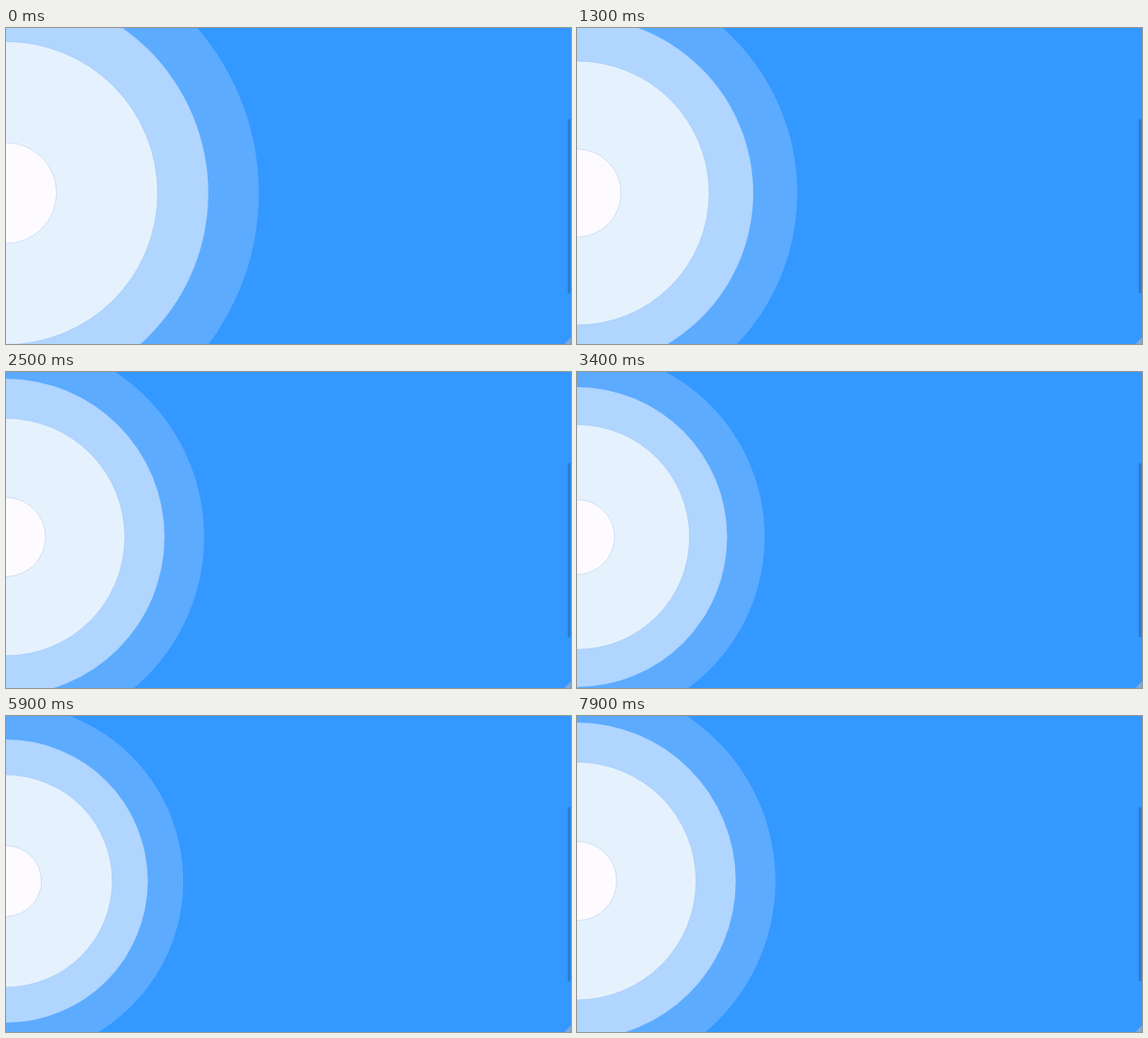
An HTML page that plays this animation: 600 px wide and 336 px high, repeating every 8000 ms.

```html
<!DOCTYPE html>
<html lang="en">
<head>
<meta charset="utf-8">
<title>Breathing circles</title>
<style>
  html, body { margin: 0; width: 100%; height: 100%; overflow: hidden; background: #3398ff; }
  svg { display: block; width: 100vw; height: 100vh; }
</style>
</head>
<body>
<svg viewBox="0 0 600 336">
  <rect width="600" height="336" fill="#3398ff"/>
  <g id="rings">
    <circle cy="175.5" data-size="5" fill="#5cabff"/>
    <circle cy="175.5" data-size="4" fill="#b0d5ff"/>
    <circle cy="175.5" data-size="3" fill="#e5f2fe" stroke="#9cc6f5" stroke-width=".6"/>
    <circle cy="175.5" data-size="1" fill="#fdfbff" stroke="#b9cfee" stroke-width=".6"/>
  </g>
  <rect x="596.6" y="97" width="2.8" height="185" rx="1.2" fill="#2a7acc"/>
  <path d="M600 329V336H593Z" fill="#7fa9d6"/>
</svg>
<script>
  const LOOP = 8000, STEP = 100;
  const REST = 188;    // smallest outer radius
  const TURN = 6.4;    // seconds until the circles grow again
  const rings = [...document.querySelectorAll('#rings circle')];

  const bezier = (s, a, b, c, d) => {
    const q = 1 - s;
    return q * q * q * a + 3 * q * q * s * b + 3 * q * s * s * c + s * s * s * d;
  };

  // Position on the exhale curve whose time coordinate is t
  function solve(t) {
    let low = 0, high = 1;
    for (let i = 0; i < 30; i++) {
      const mid = (low + high) / 2;
      if (bezier(mid, 0, 2, 3.22, TURN) < t) low = mid; else high = mid;
    }
    return low;
  }

  function outerRadius(t) {
    if (t < TURN) return REST + bezier(solve(t), 80.5, 23, 0, 0);
    return REST + 10.1 * (t - TURN) ** 2;
  }

  function draw(ms) {
    const t = Math.floor(ms / STEP) * STEP / 1000;
    const unit = outerRadius(t) / 5;
    for (const ring of rings) ring.setAttribute('r', (unit * ring.dataset.size).toFixed(2));
  }

  function tick() {
    draw(performance.now() % LOOP);
    requestAnimationFrame(tick);
  }
  tick();
</script>
</body>
</html>
```
